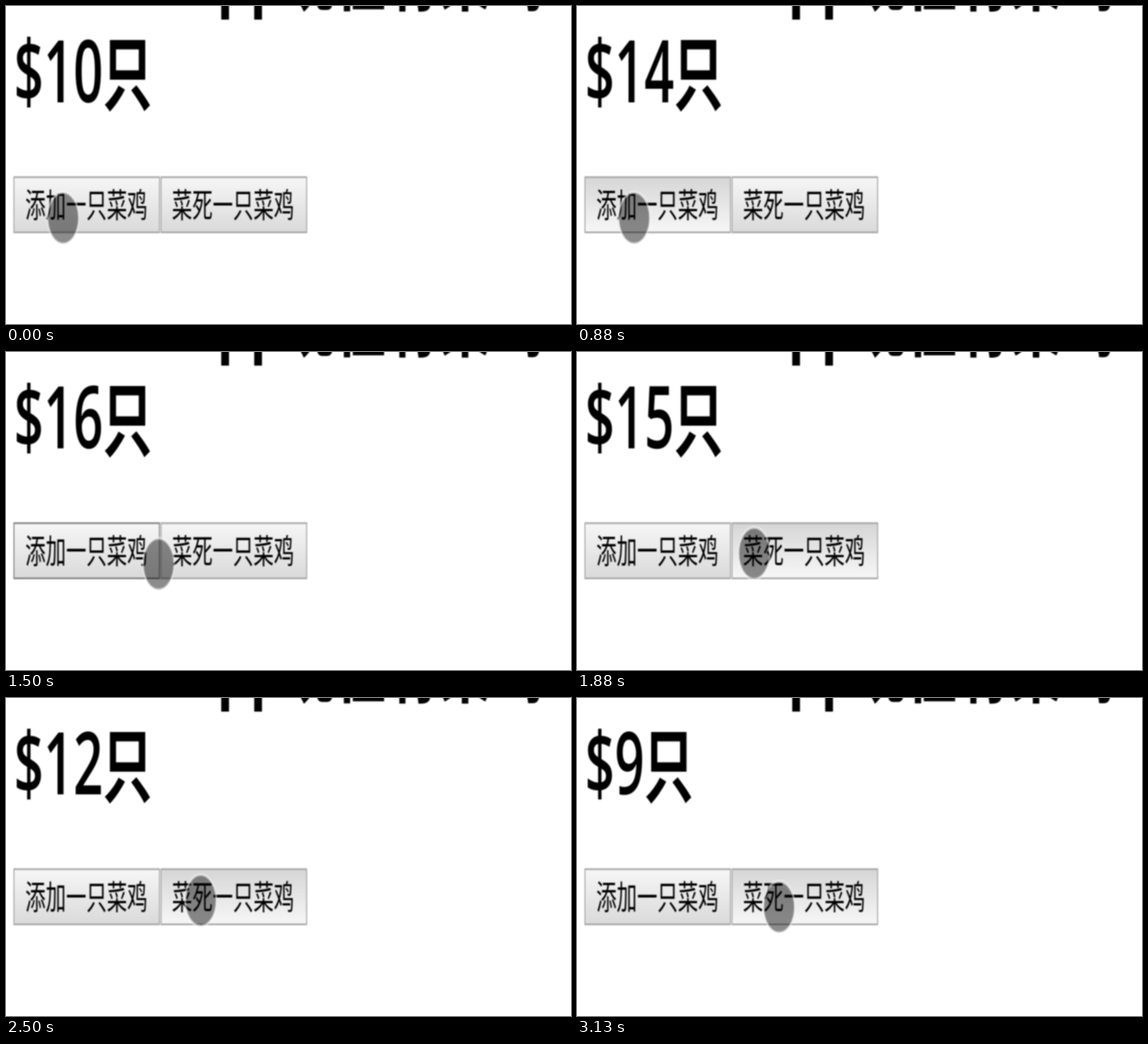
These frames come from a looping animation (998 px wide and 561 px high, 3.26 s). An HTML page:

```html
<!DOCTYPE html>
<html lang="zh-CN">
<head>
<meta charset="utf-8">
<style>
  html, body { margin: 0; width: 100%; height: 100%; overflow: hidden; background: #fff; }
  svg { display: block; width: 998px; height: 561px; overflow: visible; filter: blur(1.3px); }
  text { font-family: "Open Sans", "Noto Sans CJK SC", "Noto Sans CJK", sans-serif; }
  .title { font-size: 92px; font-weight: 700; }
  .amount { font-weight: 600; }
  .cjk { font-family: "Noto Sans CJK SC", "Noto Sans CJK", sans-serif; }
  .unit { font-size: 88px; font-weight: 700; }
  .label { font-size: 36px; font-weight: 350; }
  rect { stroke: #a6a6a6; stroke-width: 1.8; fill: url(#raised); }
  rect.hover { stroke: #808080; }
  rect.pressed { fill: url(#sunken); }
  circle { fill: rgba(0, 0, 0, .45); stroke: rgba(255, 255, 255, .5); stroke-width: 3; }
</style>
</head>
<body>
<!-- The page is shown stretched vertically by 1.65 -->
<svg viewBox="0 0 998 340" preserveAspectRatio="none">
  <defs>
    <linearGradient id="raised" x2="0" y2="1">
      <stop stop-color="#f6f6f6"/><stop offset="1" stop-color="#dadada"/>
    </linearGradient>
    <linearGradient id="sunken" x2="0" y2="1">
      <stop stop-color="#d6d6d6"/><stop offset="1" stop-color="#f7f7f7"/>
    </linearGradient>
  </defs>
  <text class="title" x="373" y="-8">pp</text>
  <text class="title cjk" x="489" y="-2.5">现在有菜鸡</text>
  <text class="title amount" x="14" y="103">$<tspan id="count">10</tspan><tspan class="cjk unit" dx="-1" dy="1.8">只</tspan></text>
  <rect id="add" x="14" y="183" width="257" height="59"/>
  <rect id="remove" x="274" y="183" width="257" height="59"/>
  <text class="label cjk" x="34" y="226">添加一只菜鸡</text>
  <text class="label cjk" x="293" y="226">菜死一只菜鸡</text>
  <circle id="pointer" r="27.5"/>
</svg>
<script>
const LOOP = 3260;
const [count, add, remove, pointer] =
  ['count', 'add', 'remove', 'pointer'].map(id => document.getElementById(id));

// start ms, count, active button, its state, pointer x, pointer y
const steps = [
  [0, 10, add, '', 101, 226.7],
  [380, 11, add, 'pressed', 101, 226.7],
  [630, 12, add, 'pressed', 101, 226.7],
  [750, 13, add, 'pressed', 101, 226.7],
  [880, 14, add, 'pressed', 101, 226.7],
  [1000, 14, add, 'hover', 101, 226.7],
  [1130, 15, add, 'pressed', 101, 226.7],
  [1250, 16, add, 'hover', 104, 227],
  [1500, 16, add, 'hover', 269.5, 226.7],
  [1630, 16, remove, 'hover', 306, 217],
  [1750, 16, remove, 'pressed', 313, 215.2],
  [1880, 15, remove, 'pressed', 313, 215.2],
  [2000, 15, remove, 'hover', 325, 215.2],
  [2130, 14, remove, 'pressed', 330, 215.2],
  [2380, 13, remove, 'pressed', 337, 215.5],
  [2500, 12, remove, 'pressed', 344, 216.5],
  [2630, 12, remove, 'hover', 349, 217.5],
  [2750, 11, remove, 'pressed', 351, 218.2],
  [2880, 11, remove, 'hover', 357, 223.6],
  [3000, 10, remove, 'pressed', 357, 223.6],
  [3130, 9, remove, 'pressed', 357, 223.6],
];

function draw(now) {
  const t = now % LOOP;
  const [, value, active, state, x, y] = steps.findLast(step => step[0] <= t);
  count.textContent = value;
  for (const button of [add, remove])
    button.setAttribute('class', button === active ? state : '');
  pointer.setAttribute('cx', x);
  pointer.setAttribute('cy', y);
  requestAnimationFrame(draw);
}
draw(0);
</script>
</body>
</html>
```
